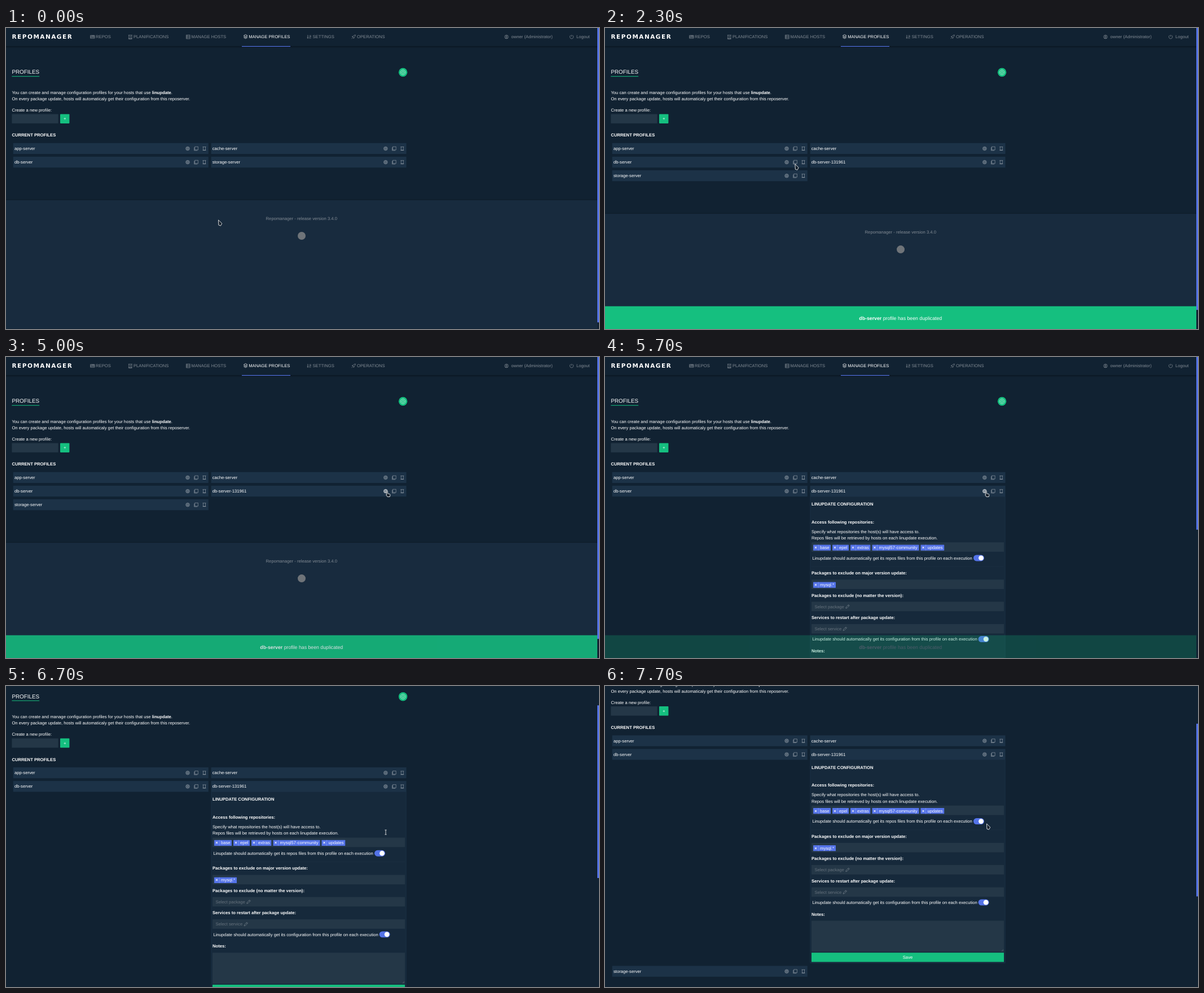
An HTML page that plays this animation: 1051x533 px, repeating every 8.2 s.

```html
<!DOCTYPE html>
<html lang="en">
<head>
<meta charset="utf-8">
<title>Profiles</title>
<style>
html, body { margin: 0; width: 100%; height: 100%; overflow: hidden; background: #112232; }
svg { display: block; width: 1051px; height: 533px; }
text { font: 7.664px "Liberation Sans", Arial, sans-serif; fill: #fff; white-space: pre; text-rendering: geometricPrecision; }
.b { font-weight: bold; }
.dim { fill: #828b94; }
.faint { fill: #66727d; }
.mid { text-anchor: middle; }
.title { font-size: 9.854px; }
.msg { font-size: 8.759px; }
.brand { font: bold 10.5px "DejaVu Sans", sans-serif; letter-spacing: 1.5px; }
.tip { font: 6.9px "Noto Sans", sans-serif; fill: #dcdcdc; }
.icon { fill: none; stroke: #fff; stroke-width: .75; }
</style>
</head>
<body>
<svg id="stage" viewBox="0 0 1051 533" xmlns="http://www.w3.org/2000/svg"></svg>
<script>
const LOOP = 8200, STEP = 100, VIEW = 533;
const GREEN = '#15bf7f', BLUE = '#5473e8', ROW = '#1c3247', FIELD = '#243747', DARK = '#182b3e';

const text = (x, y, s, cls = '') => `<text x="${x}" y="${y}" class="${cls}">${s}</text>`;
const rect = (x, y, w, h, fill, more = '') =>
  `<rect x="${x}" y="${y}" width="${w}" height="${h}" fill="${fill}" ${more}/>`;
const ring = r => `M${-r} 0a${r} ${r} 0 1 0 ${2 * r} 0a${r} ${r} 0 1 0 ${-2 * r} 0`;
const icon = (x, y, d, opacity = .45, id = '') =>
  `<path class="icon" id="${id}" opacity="${opacity}" transform="translate(${x} ${y})" d="${d}"/>`;

const ICONS = {
  gear: ring(3.3) + ring(2.2) + ring(.9),
  copy: 'M-2.3 -3.3H3.4V2.4H-2.3ZM-3.4 -2.2V3.4H2.2',
  bin: 'M-3 -3H3M-2 -3V2.8H2V-3M-3 3H3',
  repos: 'M-3.6 -2.6H3.6V2.6H-3.6ZM-3.6 -.8H3.6M-3.6 .9H3.6M-1.6 -1.7H3',
  plan: 'M-3.4 -3H3.4M-2.6 -3V3.4H2.6V-3M-1.2 -1H1.2M-1.2 1H1.2M-3.4 3.4H3.4',
  hosts: 'M-3.3 -3.3H3.3V3.3H-3.3ZM-3.3 -1.1H3.3M-3.3 1.1H3.3M-2 -2.2H-1M-2 0H-1M-2 2.2H-1',
  layers: 'M0 -3.5L3.3 -1.7L0 .1L-3.3 -1.7ZM-3.3 0L0 1.8L3.3 0M-3.3 1.7L0 3.5L3.3 1.7',
  sliders: 'M-2.6 -3.3V3.3M0 -1V3.3M2.6 -3.3V3.3M-3.5 1.3H-1.7M1.7 -1H3.5M-.6 -2.4H.6',
  rocket: 'M3.4 -3.4C.8 -3.2 -.8 -1.6 -1.8 .4L-.4 1.8C1.6 .8 3.2 -.8 3.4 -3.4ZM-1 -1L-3.2 -.2M1 1L.2 3.2M-1.8 1.8L-3.4 3.4',
  user: ring(3.2) + 'M-1.2 -.8a1.2 1.2 0 1 0 2.4 0a1.2 1.2 0 1 0 -2.4 0M-2 2.4Q0 .4 2 2.4',
  power: 'M-1.5 -2.8A3.2 3.2 0 1 0 1.5 -2.8M0 -3.6V-.4',
  pencil: 'M-3.2 3.2L-2.6 .9L1.7 -3.2L3.2 -1.7L-1 2.6ZM.6 -2.2L2.1 -.7'
};

const NAV = [
  [153.3, 159, 'REPOS', 'repos'], [220.3, 226, 'PLANIFICATIONS', 'plan'],
  [322.8, 328.5, 'MANAGE HOSTS', 'hosts'], [537.2, 543.5, 'SETTINGS', 'sliders'],
  [616, 622, 'OPERATIONS', 'rocket'], [887, 895.5, 'owner (Administrator)', 'user'],
  [1002.5, 1011, 'Logout', 'power']
];
const header = rect(0, 32, 1048, 1, '#0b1723') + rect(0, 33, 1048, 2, '#0e1c2a') +
  text(10.5, 19.2, 'REPOMANAGER', 'brand') +
  NAV.map(([ix, x, s, name]) => icon(ix, 15.7, ICONS[name]) + text(x, 18.3, s, 'dim')).join('') +
  icon(424.6, 15.2, ICONS.layers, .9) + text(430.2, 17.7, 'MANAGE PROFILES') +
  rect(418, 32, 86, 1.1, BLUE);

const intro = text(10.4, 81.4, 'PROFILES', 'title') + rect(10.4, 85.2, 48.8, 1, GREEN) +
  `<circle cx="703.6" cy="78.5" r="7.7" fill="${GREEN}"/>` +
  icon(703.6, 78.5, ring(4.3) + ring(2), .8) +
  text(10.4, 116.6, 'You can create and manage configuration profiles for your hosts that use <tspan class="b">linupdate</tspan>.') +
  text(10.4, 128.1, 'On every package update, hosts will automaticaly get their configuration from this reposerver.') +
  text(10.4, 148.2, 'Create a new profile:') +
  rect(10.4, 152.5, 82.2, 16.4, FIELD) + rect(96, 152.5, 16.4, 16.4, GREEN, 'rx=".8"') +
  text(104.2, 163.4, '+', 'mid') + text(10.4, 192.4, 'CURRENT PROFILES', 'b');

const row = (id, x, y, name) => `<g id="${id}" transform="translate(${x} ${y})">` +
  rect(0, 0, 346, 19.2, ROW) + text(2.2, 12.2, name) +
  ['gear', 'copy', 'bin'].map((k, i) =>
    icon([309.2, 324.2, 338.7][i], 9.7, ICONS[k], .45, `${id}-${k}`)).join('') + '</g>';

const tag = (x, y, w, s) => rect(x, y, w, 10.3, BLUE, 'rx=".6"') +
  rect(x + 8.8, y, .6, 10.3, '#8fa4f0') + text(x + 4.6, y + 7.8, '×', 'b mid') + text(x + 12, y + 7.8, s);
const toggle = (x, y) => rect(x, y, 19, 10.9, BLUE, 'rx="5.45"') +
  `<circle cx="${x + 13.5}" cy="${y + 5.45}" r="4.4" fill="#fff"/>`;
const field = (y, h = 16.7) => rect(366, y, 341, h, FIELD);
const hint = (y, s, px) => field(y) + text(371.5, y + 11.2, s, 'faint') + icon(px, y + 8.4, ICONS.pencil, .35);
const panel = rect(363.9, 247, 345.2, 360, '#16293b', `stroke="${ROW}" stroke-width=".9"`) +
  text(366, 263.2, 'LINUPDATE CONFIGURATION', 'b') +
  text(366, 294.5, 'Access following repositories:', 'b') +
  text(366, 311.6, 'Specify what repositories the host(s) will have access to.') +
  text(366, 323.1, 'Repos files will be retrieved by hosts on each linupdate execution.') +
  field(328.2) +
  [[369, 31, 'base'], [403, 29, 'epel'], [435, 35.3, 'extras'], [473.5, 83, 'mysql57-community'], [559.4, 41.8, 'updates']]
    .map(([x, w, s]) => tag(x, 332.4, w, s)).join('') +
  text(367.4, 358.7, 'Linupdate should automatically get its repos files from this profile on each execution') +
  toggle(653, 350.5) +
  '<path d="M366 371.2H707" stroke="#24384b" stroke-width=".6" stroke-dasharray="1 .6"/>' +
  text(366, 385, 'Packages to exclude on major version update:', 'b') +
  field(394.2) + tag(369, 398.4, 40, 'mysql.*') +
  text(366, 424.5, 'Packages to exclude (no matter the version):', 'b') + hint(433.4, 'Select package', 430) +
  text(366, 464, 'Services to restart after package update:', 'b') + hint(472.9, 'Select service', 425.3) +
  text(367.4, 502.3, 'Linupdate should automatically get its configuration from this profile on each execution') +
  toggle(661.6, 494.1) +
  text(366, 523.2, 'Notes:', 'b') + field(532, 55) +
  '<path d="M703 586L706 583M705 586L706 585" stroke="#8b949c" stroke-width=".5"/>' +
  rect(366, 588.6, 341, 16.4, GREEN) + text(536.5, 599.6, 'Save', 'mid');

const footer = '<g id="footer">' + rect(0, 303.6, 1048, 228.6, DARK) + rect(0, 303.6, 1048, 1, '#0c1824') +
  text(523.8, 340, 'Repomanager - release version 3.4.0', 'mid dim') +
  '<circle cx="524" cy="368" r="7" fill="#6f7479"/></g>';

const CURSORS = {
  arrow: '<path d="M0 0L.4 9L3.9 10.2L6.3 6.1Z" fill="#14202c" stroke="#f0f0f0" stroke-width=".9" stroke-linejoin="round"/>',
  hand: '<path d="M-.9 .2Q0 -.8 .8 .2V3.4L4.4 4.3Q5.6 4.7 5.3 6.2L4.6 9.2H.3L-2 5.6Q-1.8 4.7 -.9 5.3Z" fill="#14202c" stroke="#f0f0f0" stroke-width=".9" stroke-linejoin="round"/>',
  beam: '<path d="M-1.6 -4H1.6M0 -4V4M-1.6 4H1.6" fill="none" stroke="#e4e4e4" stroke-width=".9"/>'
};

const stage = document.getElementById('stage');
stage.innerHTML = '<clipPath id="slide"><rect id="slideBox" x="363" y="247" width="347.5" height="0"/></clipPath>' +
  '<g id="page">' + footer + header + intro +
  row('app', 12.8, 203.8, 'app-server') + row('cache', 363.6, 203.8, 'cache-server') +
  row('db', 12.8, 227.9, 'db-server') + row('dup', 363.6, 227.9, 'db-server-131961') +
  row('storage', 363.6, 227.9, 'storage-server') +
  `<g clip-path="url(#slide)">${panel}</g></g>` +
  '<g id="toast">' + rect(0, 492.7, 1048, 40.3, GREEN) +
  text(523.8, 516.6, '<tspan class="b">db-server</tspan> profile has been duplicated', 'msg mid') + '</g>' +
  rect(1048, 0, 3, VIEW, '#112232') + rect(1048, 0, 3, 0, BLUE, 'id="thumb"') +
  '<g id="tooltip">' + rect(341, 249.9, 168.2, 13.2, '#2a292b', 'stroke="#c9c9c9" stroke-width=".8"') +
  text(345, 259, 'Create a new profile from db-server configuration', 'tip') + '</g>' +
  '<g id="cursor">' + Object.entries(CURSORS).map(([k, d]) => `<g id="${k}">${d}</g>`).join('') + '</g>';

const $ = id => document.getElementById(id);
const set = (id, name, value) => $(id).setAttribute(name, value);
const show = (id, on) => set(id, 'visibility', on ? 'visible' : 'hidden');
const move = (id, x, y) => set(id, 'transform', `translate(${x} ${y})`);

// Each track lists [time, value, ...]; values ease in and out between stops.
const swing = p => .5 - Math.cos(Math.PI * p) / 2;
function track(stops, t) {
  const i = stops.findIndex(s => s[0] > t);
  if (i < 0) return stops[stops.length - 1].slice(1);
  if (i === 0) return stops[0].slice(1);
  const a = stops[i - 1], b = stops[i], k = swing((t - a[0]) / (b[0] - a[0]));
  return a.slice(1).map((v, j) => v + (b[j + 1] - v) * k);
}

const POINTER = [
  [0, 376.5, 340], [100, 375, 340.3], [200, 375, 340.3], [1100, 337.5, 247.5], [1200, 337.2, 241.8],
  [1300, 336.9, 241.2], [3700, 336.9, 241.2], [3800, 340.2, 242.8], [4200, 500, 247.6],
  [4600, 679.8, 243.5], [4800, 675.6, 238.3], [5900, 675.6, 238.3], [6600, 673, 259],
  [6800, 673, 259], [7300, 675.6, 243.8], [7600, 675.6, 243.8], [7700, 676.5, 244]
];
const SHAPES = [[0, 'arrow'], [1200, 'hand'], [2100, 'arrow'], [3000, 'hand'], [3800, 'arrow'],
  [4800, 'hand'], [6100, 'arrow'], [6500, 'beam'], [7000, 'arrow']];
const SCROLL = [[6000, 0], [6700, 59.7], [7300, 116.4]];
const TOAST = [[2000, 0], [2300, 1], [4610, 1], [6210, 0]];
const PANEL = [[5500, 0], [5650, 360]];
const TOOLTIP = [[1800, 0], [1900, 1], [2000, 1], [2100, 0]];

function render(t) {
  const [scroll] = track(SCROLL, t), [open] = track(PANEL, t), [x, y] = track(POINTER, t);
  const shape = SHAPES.filter(s => s[0] <= t).pop()[1];
  const duplicated = t >= 2100, extra = (duplicated ? 24.1 : 0) + open;
  const ratio = VIEW / (545 + extra);

  move('page', 0, -scroll);
  move('footer', 0, extra);
  show('dup', duplicated);
  move('storage', duplicated ? 12.8 : 363.6, 227.9 + extra);
  set('slideBox', 'height', open ? open + .6 : 0);
  set('thumb', 'y', scroll * ratio);
  set('thumb', 'height', VIEW * ratio);
  set('toast', 'opacity', track(TOAST, t)[0]);
  set('tooltip', 'opacity', track(TOOLTIP, t)[0]);
  set('db-copy', 'opacity', shape === 'hand' && t < 4000 ? .95 : .45);
  set('dup-gear', 'opacity', shape === 'hand' && t > 4000 ? .95 : .45);
  move('cursor', x, y);
  Object.keys(CURSORS).forEach(k => show(k, k === shape));
}

const start = performance.now();
function tick() {
  const t = (performance.now() - start) % LOOP;
  render(Math.floor(t / STEP) * STEP);
  requestAnimationFrame(tick);
}
tick();
</script>
</body>
</html>
```
